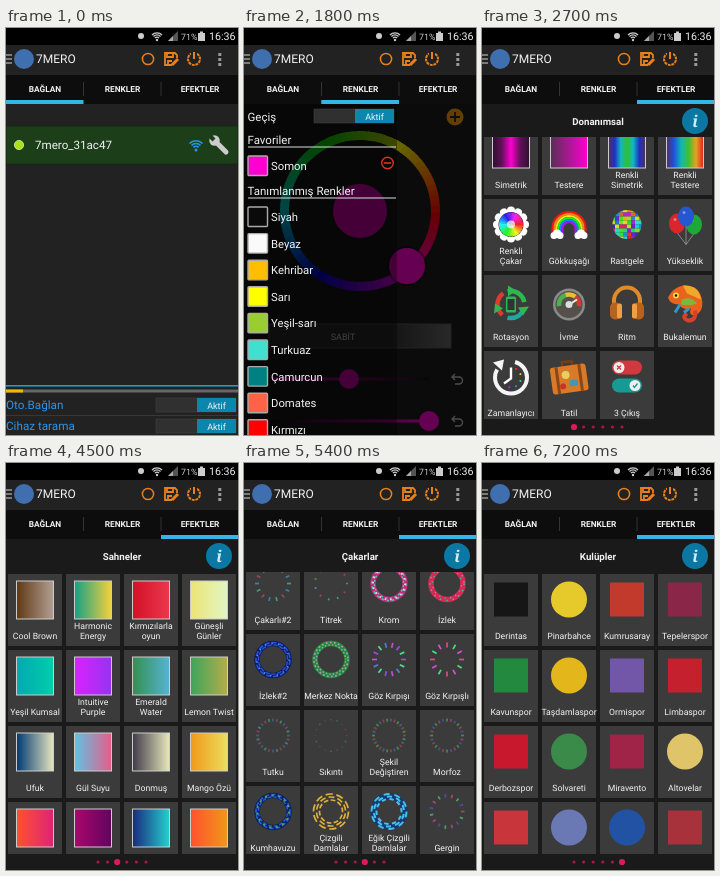
Write an HTML page that moves like this. It is 232 px wide and 407 px high and loops after 8000 ms.

```html
<!DOCTYPE html>
<html lang="tr">
<head>
<meta charset="utf-8">
<style>
html, body { margin: 0; height: 100%; overflow: hidden; background: #141414 }
svg { display: block; width: 100vw; height: 100vh; font-family: Roboto, sans-serif; text-rendering: geometricPrecision }
</style>
</head>
<body>
<svg id="stage" viewBox="0 0 232 407"></svg>
<script>
const BLUE = '#33b5e5', ORANGE = '#e8801c', MAGENTA = '#ff00d0';
let defs = '<clipPath id="list"><rect y="109" width="232" height="282"/></clipPath>' +
  '<clipPath id="ball"><circle r="14.5"/></clipPath>', gradients = 0;

const rect = (x, y, w, h, fill, more = '') =>
  `<rect x="${x}" y="${y}" width="${w}" height="${h}" fill="${fill}" ${more}/>`;
const disc = (x, y, r, fill, more = '') => `<circle cx="${x}" cy="${y}" r="${r}" fill="${fill}" ${more}/>`;
const line = (d, color, w = 1, more = '') =>
  `<path d="${d}" fill="none" stroke="${color}" stroke-width="${w}" ${more}/>`;
const shape = (d, fill) => `<path d="${d}" fill="${fill}"/>`;
const text = (x, y, s, size, fill = '#f2f2f2', more = '') =>
  `<text x="${x}" y="${y}" font-size="${size}" fill="${fill}" ${more}>${s}</text>`;
const middle = 'text-anchor="middle"', bold = middle + ' font-weight="bold"';
const at = (x, y, s, turn = 0) => `<g transform="translate(${x} ${y}) rotate(${turn})">${s}</g>`;
const repeat = (n, f) => Array.from({ length: n }, (_, i) => f(i)).join('');
// Dashes are measured in degrees.
const ring = (r, w, color, dash = '360 0', shift = 0) =>
  disc(0, 0, r, 'none', `stroke="${color}" stroke-width="${w}" pathLength="360" stroke-dasharray="${dash}" stroke-dashoffset="${-shift}"`);
const gradient = (...stops) => {
  const id = 'g' + gradients++;
  defs += `<linearGradient id="${id}">` + stops.map((c, i) =>
    `<stop offset="${i / (stops.length - 1)}" stop-color="${c}"/>`).join('') + '</linearGradient>';
  return `url(#${id})`;
};
const wifi = (x, y, color, size) => at(x, y, disc(0, 0, size * .17, color) + [.4, .7, 1].map(k => {
  const r = size * k, e = r * .72;
  return line(`M${-e} ${-e}A${r} ${r} 0 0 1 ${e} ${-e}`, color, size * .18);
}).join(''));
const toggle = (x, y) => rect(x, y, 80, 14, '#303030', 'stroke="#444" stroke-width=".5"') +
  rect(x + 41, y, 39, 14, '#0d86ae') + text(x + 60.5, y + 10.5, 'Aktif', 9, '#eaf6fb', middle);

const header = () =>
  rect(0, 0, 232, 17, '#000') + rect(0, 17, 232, 30, '#222') + rect(0, 47, 232, 29, '#0d0d0d') +
  disc(135, 8, 3, '#ccc') + wifi(151, 12, '#ccc', 7) + shape('M162 13h10V3z', '#555') +
  shape('M162 13h5V8z', '#aaa') + text(175, 12, '71%', 8.8, '#ccc') +
  rect(192, 5, 7, 8, '#ccc') + rect(194, 3.5, 3, 2, '#ccc') + text(203, 12.3, '16:36', 10.7, '#eee') +
  line('M0 27h6M0 31h6M0 35h6', '#999', 1.5) + disc(18, 31, 10, '#3f6fae') + text(30, 35.3, '7MERO', 12) +
  disc(142, 31, 5.6, 'none', `stroke="${ORANGE}" stroke-width="1.5"`) +
  line('M166 37h-7V25h10l2 2v3M161 25v4h6v-4M162 37v-4h4', ORANGE, 1.8) + line('M166 37l6-6', ORANGE, 3) +
  at(188, 31, ring(6, 2, ORANGE, '28 8', -60) + rect(-3, -8, 6, 5, '#222') + line('M0-7v7', ORANGE, 2)) +
  [25, 30, 35].map(y => rect(212.3, y, 3, 3, '#999')).join('') +
  ['BAĞLAN', 'RENKLER', 'EFEKTLER'].map((s, i) => text(39 + i * 77.5, 64.2, s, 8.3, '#f2f2f2', bold)).join('') +
  line('M77.5 54v14M155 54v14', '#333');
const underline = i => rect(i * 77.5, 72, 77.5, 4, BLUE);

const connect = () => underline(0) + rect(0, 76, 232, 331, '#222') +
  rect(0, 98, 232, 38, '#1c3f1a', 'stroke="#152a14"') +
  disc(13, 117, 4.6, '#a8e01c', 'stroke="#d8f59a" stroke-width=".8"') +
  text(29, 121.3, '7mero_31ac47', 11.6) + wifi(190, 122, '#2196e8', 9) +
  line('M209 113l11 11', '#ccc', 5, 'stroke-linecap="round"') + disc(208.5, 112.5, 5.2, '#ccc') +
  line('M203 107l5 5', '#1c3f1a', 4.2) +
  rect(0, 357, 232, 1.6, '#2599c4') + rect(0, 361.5, 232, 3, '#666') + rect(0, 361.5, 17, 3, '#f5b800') +
  text(0, 381.3, 'Oto.Bağlan', 11.7, '#2a96ee') + toggle(150, 370) + rect(0, 387, 232, 1, '#383838') +
  text(0, 402.3, 'Cihaz tarama', 11.7, '#2a96ee') + toggle(150, 391);

const undo = y => at(213, y, line('M-5-2h7a3.5 3.5 0 0 1 0 7h-4M-2-5l-3 3 3 3', '#bbb', 1.4));
const slider = (x, y, from, to) =>
  rect(28, y - 1.5, 157, 3, gradient(from, to)) + disc(x, y, 10, MAGENTA) + undo(y);
const wheel = () => underline(1) + rect(0, 76, 232, 331, '#1c1c1c') +
  at(116, 183, repeat(90, i => ring(75.5, 9, `hsl(${360 - i * 4} 100% 50%)`, '5 355', i * 4)) +
    disc(0, 0, 27, MAGENTA) + disc(47, 55, 20, '#000', 'opacity=".4"') + disc(47, 55, 18, MAGENTA)) +
  disc(211, 89, 8.5, '#f59a10') + line('M206 89h10M211 84v10', '#222', 1.8) +
  rect(25, 296, 182, 24, gradient('#333', '#333', '#333', '#666'), 'stroke="#555"') +
  text(99, 312, 'SABİT', 9, '#f2f2f2', middle) + slider(105, 351, MAGENTA, '#111') + slider(185, 393, '#111', MAGENTA);

const swatch = (y, color, name) =>
  rect(4, y - 10, 19.5, 19.5, color, 'stroke="#aaa" stroke-width="1.4" rx="1"') + text(27, y + 4, name, 11.3);
const drawer = () => wheel() + rect(0, 76, 232, 331, '#000', 'opacity=".6"') +
  rect(0, 76, 153, 331, '#000', 'opacity=".33"') + underline(1) +
  text(3.5, 93, 'Geçiş', 11.5) + toggle(70, 81) +
  text(3.5, 116, 'Favoriler', 11.5) + rect(4, 118.5, 148, 1, '#ddd') + swatch(138, MAGENTA, 'Somon') +
  disc(143.5, 135, 5.8, 'none', 'stroke="#d8322c" stroke-width="1.4"') + rect(140, 134.2, 7, 1.6, '#d8322c') +
  text(3.5, 167, 'Tanımlanmış Renkler', 11.5) + rect(4, 169.5, 148, 1, '#ddd') +
  [['#0a0a0a', 'Siyah'], ['#fafafa', 'Beyaz'], ['#ffbf00', 'Kehribar'], ['#ff0', 'Sarı'], ['#9acd32', 'Yeşil-sarı'],
   ['#40e0d0', 'Turkuaz'], ['#008080', 'Çamurcun'], ['#ff6347', 'Domates'], ['#f00', 'Kırmızı']]
    .map(([color, name], i) => swatch(189 + i * 26.6, color, name)).join('');

const tile = (x, y, label, icon) => {
  const rows = label.split('|');
  return at(x, y, rect(0, 0, 54, 72, '#3b3b3b') + at(27, 25.5, icon) +
    rows.map((s, i) => text(27, 65 - 10.5 * (rows.length - 1 - i), s, 8.7, '#f2f2f2', middle)).join(''));
};
const effects = (page, title, top, tiles) => underline(2) + rect(0, 76, 232, 331, '#1a1a1a') +
  text(116, 96.5, title, 9.7, '#f2f2f2', bold) + disc(213, 93, 13, '#0b78a4') +
  text(213, 98.5, 'i', 16, '#d8eaf2', bold + ' font-style="italic" font-family="Noto Serif, serif"') +
  '<g clip-path="url(#list)">' +
  tiles.map(([label, icon], i) => tile(2 + i % 4 * 58, top + (i >> 2) * 76, label, icon)).join('') + '</g>' +
  repeat(6, i => disc(92 + i * 9.6, 399, i == page ? 3.1 : 1.6, i == page ? '#d81b60' : '#a8164c'));
const box = (...colors) => rect(-18.5, -18.5, 37, 38, gradient(...colors), 'stroke="#ccc"');

const arrows = ring(13.5, 4.5, '#e0392f', '105 255', 130) + ring(13.5, 4.5, '#1fa8a0', '85 275', 20) +
  ring(13.5, 4.5, '#2fb84e', '95 265', 255) +
  shape('M-3-19l8 5-8 6zM18 2l-6 9-5-8zM-17 9l1-10 8 5z', '#2fb84e');
const cloud = x => disc(x - 3, 11, 3.5, '#fff') + disc(x, 9, 4, '#fff') + disc(x + 3, 11, 3.5, '#fff');
const balloon = (x, y, color) => line(`M${x} ${y + 9}L1 20`, '#bbb', .6) +
  `<ellipse cx="${x}" cy="${y}" rx="8" ry="10" fill="${color}"/>` + disc(x - 2, y - 4, 1.5, '#fff', 'opacity=".4"');
const mosaic = '<g clip-path="url(#ball)">' + repeat(64, i =>
  rect(i % 8 * 4 - 16, (i >> 3) * 4 - 16, 4, 4, `hsl(${i * i * 47 % 360} 75% 50%)`)) + '</g>';
const flower = repeat(12, i => at(0, 0, disc(14, 0, 4, '#fff'), i * 30)) + disc(0, 0, 15, '#fff') +
  disc(0, 0, 12.5, '#222') + repeat(24, i => at(0, 0, shape('M0 0L12-2V2z', `hsl(${i * 15} 90% 55%)`), i * 15)) +
  disc(0, 0, 4, '#fff', 'opacity=".7"');
const gauge = disc(0, 0, 16, '#8a8a8a') + disc(0, 0, 13.5, '#55504c') + ring(10, 4.5, '#4caf50', '80 280', 170) +
  ring(10, 4.5, '#e8c030', '60 300', 250) + ring(10, 4.5, '#d8392f', '60 300', 310) +
  line('M-1 1L8-5', '#eee', 2) + disc(0, 0, 3.5, '#ddd');
const headphones = line('M-13 6V-2A13 13 0 0 1 13-2V6', '#e08a2a', 4) +
  rect(-17, 0, 11, 17, '#b8621c', 'rx="5"') + rect(6, 0, 11, 17, '#b8621c', 'rx="5"') +
  rect(-10, 1, 5, 15, '#f0a040', 'rx="2"') + rect(5, 1, 5, 15, '#f0a040', 'rx="2"');
const chameleon = shape('M-17-5Q-12-15-2-17Q14-18 17-3Q19 10 9 13Q3 12 6 6Q-2 8-6 2Q-15 2-17-5z', '#e8641e') +
  shape('M-2-17Q14-18 16-3Q9-6 2-9z', '#f0a828') + shape('M-3-3Q6-7 12 1Q5 4-4 2z', '#7cb83a') +
  line('M10 8Q12 18 3 18Q-4 15 2 11', '#d8402a', 4) + line('M-5 2l-5 8M4 6l-5 4', '#2a9bd0', 3) +
  disc(-9, -7, 3, '#ffd84a') + disc(-9, -7, 1.2, '#111');
const clock = ring(16, 4, '#f5f5f5', '285 75', 285) + shape('M-18-15l11-3-2 11z', '#f5f5f5') +
  repeat(5, i => at(0, 0, disc(10, 0, 1, `hsl(${i * 70} 80% 55%)`), i * 40 - 60)) + line('M0-10V1l-7 5', '#fff', 2.4);
const suitcase = at(0, 1, line('M-5-11v-5h10v5', '#7a3c14', 2.4) + rect(-18, -12, 36, 27, '#d87a28', 'rx="3"') +
  rect(-13, -12, 3, 27, '#8a4818') + rect(10, -12, 3, 27, '#8a4818') + disc(-3, -3, 4, '#e8d060') +
  rect(0, 3, 8, 6, '#3c9ab8') + disc(-7, 8, 3, '#c8342a'), -8);
const pill = (y, color, x, mark) => rect(-15, y - 7, 30, 14, color, 'rx="7"') +
  at(x, y, disc(0, 0, 5.5, '#eee') + line(mark, color, 1.3));
const hardware = [
  ['Simetrik', box('#301030', '#601058', MAGENTA, '#601058', '#301030')], ['Testere', box('#553055', MAGENTA)],
  ['Renkli|Simetrik', box('#503060', '#2030c0', '#10b8c0', '#30c030', '#10b8c0', '#2030c0', '#503060')],
  ['Renkli|Testere', box('#503060', '#2050e0', '#10b8b0', '#40c030', '#e8a020', '#e02020')],
  ['Renkli|Çakar', flower],
  ['Gökkuşağı', repeat(6, i => {
    const r = 16.5 - i * 2;
    return line(`M${-r} 10V4A${r} ${r} 0 0 1 ${r} 4V10`, `hsl(${[0, 30, 55, 120, 210, 280][i]} 90% 52%)`, 2.1);
  }) + cloud(-12) + cloud(12)],
  ['Rastgele', mosaic],
  ['Yükseklik', balloon(9, 0, '#1fa83a') + balloon(-8, -1, '#d8262c') + balloon(1, -8, '#2457d0')],
  ['Rotasyon', at(0, 4, arrows + rect(-5, -8, 10, 16, '#2fb84e', 'rx="1.5"') + rect(-3.5, -5.5, 7, 11, '#333'))],
  ['İvme', at(0, 4, gauge)], ['Ritm', at(0, 2, headphones)], ['Bukalemun', at(0, 2, chameleon)],
  ['Zamanlayıcı', at(0, 1, clock)], ['Tatil', suitcase],
  ['3 Çıkış', pill(-9, '#d0393f', -8, 'M-2-2l4 4M2-2l-4 4') + pill(9, '#159a94', 8, 'M-2 0l1.5 2 3-4')]
];

const blend = (label, a, b) => [label, box('#' + a, '#' + b)];
const scenes = [
  blend('Cool Brown', '603813', 'b29f94'), blend('Harmonic|Energy', '16a085', 'f4d03f'),
  blend('Kırmızılarla|oyun', 'd31027', 'ea384d'), blend('Güneşli|Günler', 'ede574', 'e1f5c4'),
  blend('Yeşil Kumsal', '02aab0', '00cdac'), blend('Intuitive|Purple', 'da22ff', '9733ee'),
  blend('Emerald|Water', '348f50', '56b4d3'), blend('Lemon Twist', '3ca55c', 'b5ac49'),
  blend('Ufuk', '003973', 'e5e5be'), blend('Gül Suyu', '5fc3e4', 'e55d87'),
  blend('Donmuş', '403b4a', 'e7e9bb'), blend('Mango Özü', 'f09819', 'edde5d'),
  blend('', 'ff512f', 'dd2476'), blend('', 'aa076b', '61045f'),
  blend('', '1a2980', '26d0ce'), blend('', 'ff512f', 'f09819')
];
const fades = ['Alev', 'Deniz', 'Orman', 'Gece', 'Şafak', 'Bahar', 'Lavanta', 'Buz', 'Kum', 'Mercan', 'Bulut', 'Toprak', '', '', '', '']
  .map((name, i) => [name, box(`hsl(${i * 67} 80% 42%)`, `hsl(${i * 67 + 60} 80% 55%)`)]);

const sparks = (n, r, len, hues, alpha = 1) => repeat(n, i => at(0, 0,
  line(`M${r} 0h${len}`, `hsl(${hues[i % hues.length]} 65% 58%)`, 1.7, `opacity="${alpha}"`), i * 360 / n));
const band = (base, dots, dash) => ring(16, 5.5, base) + ring(17, 1.6, dots, dash) + ring(14.6, 1.4, dots, dash, 7);
const flashes = [
  ['Çakarlı#2', sparks(14, 14, 4, [160, 200, 340], .6)], ['Titrek', sparks(11, 15, 2, [130, 350, 180], .6)],
  ['Krom', band('#c02a78', '#58c0b0', '8 10') + ring(16, 2, '#d8d0e8', '6 14')],
  ['İzlek', band('#d82858', '#3fc088', '5 17')],
  ['İzlek#2', band('#0c1a5c', '#2a50e0', '18 6') + ring(16, 1.4, '#38a0e0', '5 19')],
  ['Merkez Nokta', band('#258a3c', '#a8a0b8', '6 8')],
  ['Göz Kırpışı', sparks(14, 12, 5, [270, 150, 220, 290])],
  ['Göz Kırpışlı', sparks(12, 12, 5, [335, 140, 300])],
  ['Tutku', sparks(24, 14, 3, [220, 350, 160], .45)], ['Sıkıntı', sparks(16, 15, 1.5, [0, 140, 230], .3)],
  ['Şekil|Değiştiren', sparks(26, 14, 3, [0, 130, 220], .5)], ['Morfoz', sparks(24, 14, 3, [130, 340, 230], .5)],
  ['Kumhavuzu', band('#10205a', '#2a5ae0', '14 8') + ring(16, 1.8, '#38b070', '8 16')],
  ['Çizgili|Damlalar', [17.5, 14.5, 11.5].map((r, i) => ring(r, 1.7, '#e0b038', '24 12', i * 8)).join('')],
  ['Eğik Çizgili|Damlalar', ring(15.5, 6, '#123a78') + [17.5, 15, 12.5].map((r, i) => ring(r, 2, '#48c0e8', '20 16', i * 10)).join('')],
  ['Gergin', sparks(15, 14, 3.5, [335, 140, 250], .65)]
];

const flag = (label, stripes, upright) => [label, stripes.split(' ').map((color, i, all) => {
  const n = all.length;
  return upright ? rect(-18 + i * 36 / n, -13, 36 / n, 26, color) : rect(-18, -13 + i * 26 / n, 36, 26 / n, color);
}).join('')];
const flags = [
  flag('Almanya', '#111 #d00 #fc0'), flag('Fransa', '#0a3a94 #fff #e33', 1), flag('İtalya', '#094 #fff #c23', 1),
  flag('Belçika', '#111 #fd2 #e33', 1), flag('Hollanda', '#a12 #fff #249'), flag('İrlanda', '#195 #fff #f83', 1),
  flag('Avusturya', '#e23 #fff #e23'), flag('Romanya', '#027 #fd1 #c12', 1), flag('Macaristan', '#c23 #fff #465'),
  flag('Bulgaristan', '#fff #096 #d21'), flag('Estonya', '#07c #111 #fff'), flag('Polonya', '#fff #d13'),
  flag('', '#05b #fd0'), flag('', '#fb1 #064 #c22'), flag('', '#1b4 #fd1 #c12', 1), flag('', '#e23 #fff')
];

const square = (label, color) => [label, rect(-17, -17, 34, 34, color)];
const round = (label, color) => [label, disc(0, 0, 18, color)];
const clubs = [
  square('Derintas', '#161616'), round('Pinarbahce', '#e6c92a'), square('Kumrusaray', '#c23a2c'), square('Tepelerspor', '#8a2748'),
  square('Kavunspor', '#23893f'), round('Taşdamlaspor', '#e3b71b'), square('Ormispor', '#7257a8'), square('Limbaspor', '#c5202e'),
  square('Derbozspor', '#c8182e'), round('Solvareti', '#3a8a4a'), square('Miravento', '#a02348'), round('Altovelar', '#dfc46a'),
  square('', '#c8353a'), round('', '#6a78b4'), round('', '#2152a4'), square('', '#a8323c')
];

const views = [
  connect(), wheel(), drawer(), effects(0, 'Donanımsal', 95, hardware), effects(1, 'Geçişler', 111, fades),
  effects(2, 'Sahneler', 111, scenes), effects(3, 'Çakarlar', 95, flashes),
  effects(4, 'Bayraklar', 111, flags), effects(5, 'Kulüpler', 111, clubs)
];
const stage = document.getElementById('stage');
stage.innerHTML = `<defs>${defs}</defs>` + header() + views.map(v => `<g class="view">${v}</g>`).join('');
const groups = [...stage.querySelectorAll('.view')];

function draw() {
  const current = Math.floor(performance.now() % 8000 / 900);
  groups.forEach((g, i) => g.style.display = i == current ? '' : 'none');
  requestAnimationFrame(draw);
}
draw();
</script>
</body>
</html>
```
